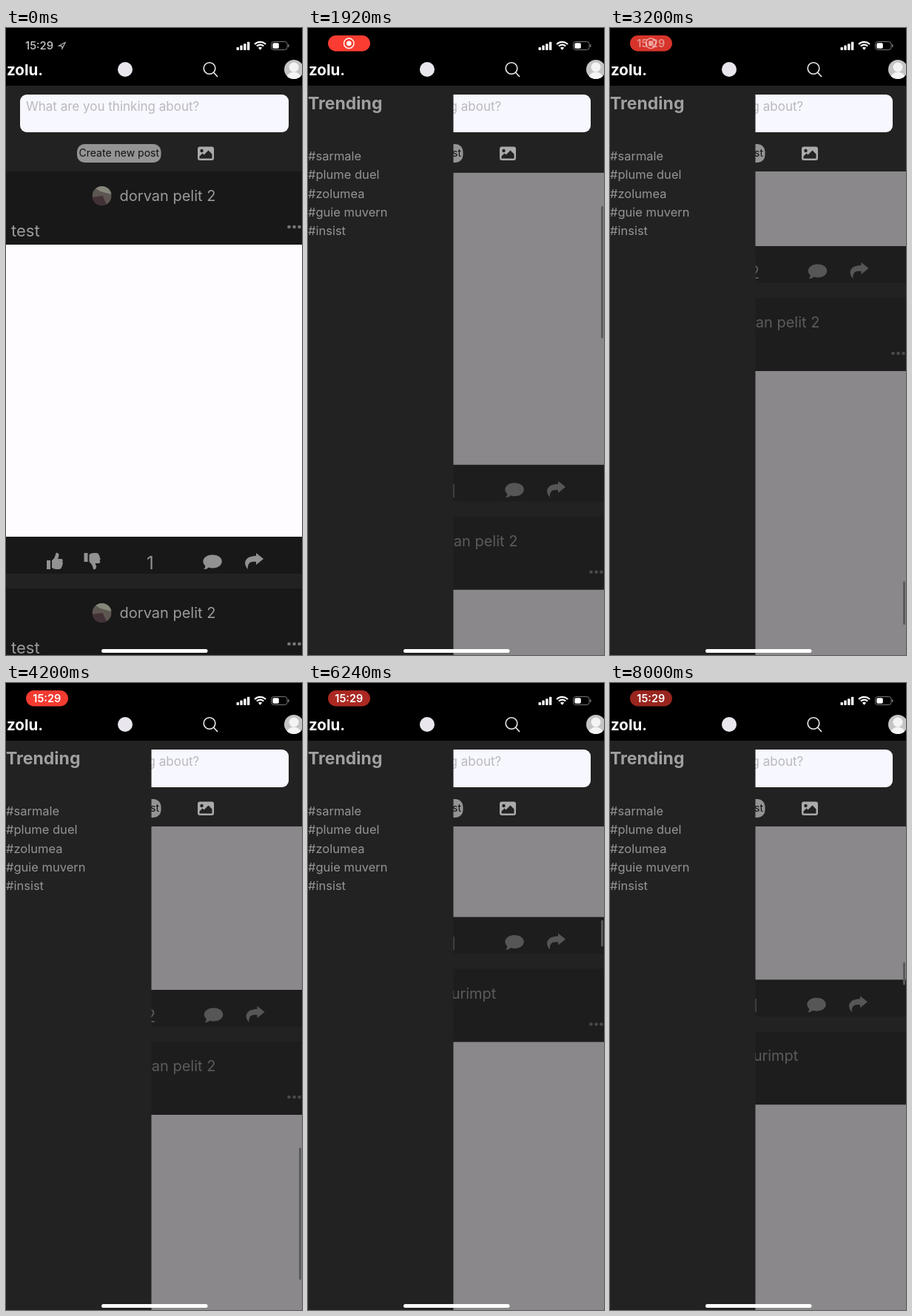
An HTML page with a canvas that plays this animation: 400x848 px, repeating every 8040 ms.

```html
<!DOCTYPE html>
<html lang="en">
<head>
<meta charset="utf-8">
<title>Feed with trending drawer</title>
<style>
html, body { margin: 0; width: 100%; height: 100%; overflow: hidden; background: #000; }
canvas { display: block; width: 400px; height: 848px; }
</style>
</head>
<body>
<canvas id="stage"></canvas>
<script>
const LOOP = 8040, FEED_TOP = 194, PERIOD = 564, DRAWER = 196.5, PAGE = '#222';
const FIRST_USER = 'dorvan pelit 2', SECOND_USER = 'zurimpt';
const TAGS = ['#sarmale', '#plume duel', '#zolumea', '#guie muvern', '#insist'];
// [time, scroll offset]; the dip after 3200 is the bounce at the list end
const SCROLL = [[0, 0], [1720, 0], [1920, 96.5], [2500, 760], [2960, 1420], [3200, 1521],
  [3640, 1401], [4260, 1401], [4800, 1490], [5560, 1707], [6200, 2040], [6920, 2497.5],
  [7450, 3020], [8000, 3670], [8040, 3695]];

const canvas = document.getElementById('stage');
const c = canvas.getContext('2d');
const dpr = window.devicePixelRatio || 1;
canvas.width = 400 * dpr;
canvas.height = 848 * dpr;

const clamp = v => Math.max(0, Math.min(1, v));
const ramp = (t, a, b) => clamp((t - a) / (b - a));
const smooth = v => v * v * (3 - 2 * v);

// Cubic interpolation that stays flat at turning points
function follow(keys, t) {
  let i = 0;
  while (i < keys.length - 2 && t >= keys[i + 1][0]) i++;
  const slope = k => (keys[k + 1][1] - keys[k][1]) / (keys[k + 1][0] - keys[k][0]);
  const tangent = k => {
    if (k < 1 || k > keys.length - 2) return 0;
    const a = slope(k - 1), b = slope(k);
    return a * b <= 0 ? 0 : 2 * a * b / (a + b);
  };
  const [t0, y0] = keys[i], [t1, y1] = keys[i + 1];
  const d = t1 - t0, u = (t - t0) / d, s = smooth(u);
  return y0 + (y1 - y0) * s + d * u * (1 - u) * ((1 - u) * tangent(i) - u * tangent(i + 1));
}

function rect(x, y, w, h, fill, r = 0) {
  c.fillStyle = fill;
  c.beginPath();
  c.roundRect(x, y, w, h, r);
  c.fill();
}
function disc(x, y, r, fill) {
  c.fillStyle = fill;
  c.beginPath();
  c.arc(x, y, r, 0, 7);
  c.fill();
}
function ring(x, y, r, stroke, width) {
  c.strokeStyle = stroke;
  c.lineWidth = width;
  c.beginPath();
  c.arc(x, y, r, 0, 7);
  c.stroke();
}
function text(str, x, y, size, fill, weight = 400, align = 'left') {
  c.font = `${weight} ${size}px Inter, Roboto, sans-serif`;
  c.textAlign = align;
  c.fillStyle = fill;
  c.fillText(str, x, y);
}
function shape(d, x, y, fill, flip = 1) {
  c.save();
  c.translate(x, y);
  c.scale(1, flip);
  c.fillStyle = fill;
  c.fill(new Path2D(d));
  c.restore();
}
function clipped(path, draw) {
  c.save();
  c.beginPath();
  path();
  c.clip();
  draw();
  c.restore();
}
function faded(alpha, draw) {
  if (alpha <= 0) return;
  c.save();
  c.globalAlpha *= alpha;
  draw();
  c.restore();
}

const THUMB = 'M-11-1h5v12h-5zM-4-1Q0-4 1-9Q1-12 4-11Q7-9 4-3H9Q12-2 10 1Q12 3 10 5Q11 7 9 8Q9 11 5 11H2Q-1 11-4 9z';
const COMMENT = 'M0-9.5C17-9.5 17 8.5 0 8.5Q-3 8.5-5 7.5Q-8 10.5-12 10Q-9 7.5-10 5C-16-1-11-9.5 0-9.5z';
const SHARE = 'M3-11L13-3 3 5V1C-5 0-9 3-8 11C-16 2-11-7 3-7z';

function postPhoto(x, y) {
  clipped(() => c.arc(x, y, 13, 0, 7), () => {
    rect(x - 13, y - 13, 26, 26, '#5d5650');
    shape('M-13-13H13V-2L-2-6z', x, y, '#85877a');
    shape('M-13 2L1 0 7 13H-13z', x, y, '#423136');
  });
}

function post(i, y) {
  const name = i < 4 ? FIRST_USER : SECOND_USER;
  const count = i % 3 ? 2 : 1;
  const grey = '#9b9b9b', icon = '#929292';
  rect(0, y, 400, 544, '#181818');
  c.font = '400 20px Inter, Roboto, sans-serif';
  const left = 200 - (c.measureText(name).width + 37) / 2;
  postPhoto(left + 13, y + 33);
  text(name, left + 37, y + 40, 20, grey);
  text('test', 7, y + 88, 22, grey);
  if (i !== 7) for (let k = 0; k < 3; k++) disc(382.5 + k * 7, y + 75, 2.3, '#777');
  rect(0, y + 99, 400, 395, '#fffcff');
  const nudge = count - 1;
  shape(THUMB, 66 - nudge, y + 527, icon);
  shape(THUMB, 116.5 - nudge, y + 527, icon, -1);
  text(count, 195, y + 538, 24, icon, 400, 'center');
  shape(COMMENT, 279 + nudge * 1.5, y + 528, icon);
  shape(SHARE, 335 + nudge * 1.5, y + 527, icon);
}

function scrollbar(t, offset) {
  const content = t < 4260 ? 2330 : t < 5700 ? 10412 : t < 7500 ? 11570 : 13435;
  const max = content - 929;
  const full = 595 * 700 / content;
  const h = full - Math.max(0, offset - max);
  const y = offset > max ? 807 - h : 212 + offset / max * (595 - full);
  faded(ramp(t, 1740, 1840), () => rect(396, y, 3, h, '#5a595b', 1.5));
}

function feed(t, open, veil) {
  const offset = follow(SCROLL, t);
  clipped(() => c.rect(0, FEED_TOP, 400, 848 - FEED_TOP), () => {
    const first = Math.floor(offset / PERIOD);
    for (let i = first; i < first + 3; i++) post(i, FEED_TOP + i * PERIOD - offset);
    faded(open * 0.53 + veil * 0.24, () => rect(0, FEED_TOP, 400, 654, PAGE));
    scrollbar(t, offset);
  });
}

function composer() {
  rect(19, 90, 363, 51, '#f7f7ff', 9);
  text('What are you thinking about?', 27, 112, 17, '#b9b9be');
  rect(96, 157, 113.5, 25, '#949494', 10);
  text('Create new post', 152.8, 174, 14, '#111', 400, 'center');
  rect(259, 160.5, 22, 18.5, '#aaa', 3);
  disc(264.5, 166, 2.2, PAGE);
  shape('M0 0V-3L4-7 6-5 12-11 17-6V0z', 261.5, 176.5, PAGE);
}

function drawer(open) {
  const x = -DRAWER * (1 - open);
  rect(x, 78, DRAWER, 770, PAGE);
  text('Trending', x, 109.5, 23, '#a0a0a0', 700);
  TAGS.forEach((tag, i) => text(tag, x, 179 + i * 25.3, 16.5, '#949494'));
}

function header() {
  rect(0, 0, 400, 78, '#000');
  text('zolu.', 1, 64, 20.5, '#fff', 700);
  disc(161, 56, 10, '#e9e6ee');
  ring(275, 54.5, 7.8, '#eee', 1.6);
  c.beginPath();
  c.moveTo(280.7, 60.3);
  c.lineTo(286, 66);
  c.stroke();
  clipped(() => c.arc(389, 56, 13, 0, 7), () => {
    rect(376, 43, 26, 26, '#c4c4c4');
    disc(389, 53, 6.5, '#f4f4f4');
    disc(389, 70, 10.5, '#f4f4f4');
  });
}

function pill(t) {
  let glow = 0.8 + 0.2 * Math.cos((t - 4080) / 1600 * 2 * Math.PI);
  if (t < 3400) glow = t < 3200 ? 1 - 0.14 * ramp(t, 3000, 3200) : 0.86 - 0.24 * ramp(t, 3200, 3400);
  const shade = [250, 60, 50].map(v => Math.round(v * glow));
  rect(27, 10, 57, 21.5, `rgb(${shade})`, 10.75);
  const clock = ramp(t, 3100, 3320);
  faded(1 - clock, () => {
    ring(55.3, 20.8, 6.8, '#fff', 1.4);
    disc(55.3, 20.8, 3.4, '#fff');
  });
  faded(clock, () => text('15:29', 55.3, 26, 14.5, '#fff', 600, 'center'));
}

function statusBar(t) {
  const recording = ramp(t, 320, 520);
  faded(1 - recording, () => {
    text('15:29', 26, 29, 14.8, '#c8c8c8', 500);
    c.strokeStyle = '#b5b5b5';
    c.lineWidth = 1.2;
    c.stroke(new Path2D('M71.5 24L80 19.5 76 28 75.5 24.3z'));
  });
  faded(recording, () => pill(t));
  for (let i = 0; i < 4; i++) rect(311.5 + i * 4.8, 26 - i * 2.4, 3.4, 4 + i * 2.4, '#fff', 0.8);
  c.strokeStyle = '#fff';
  c.lineWidth = 2.2;
  for (const r of [6.4, 10.2]) {
    c.beginPath();
    c.arc(343.5, 29, r, -Math.PI * 0.76, -Math.PI * 0.24);
    c.stroke();
  }
  shape('M0 0L-2.6-3Q0-5 2.6-3z', 343.5, 29.8, '#fff');
  c.strokeStyle = '#777';
  c.lineWidth = 1;
  c.beginPath();
  c.roundRect(358.5, 18.5, 21.5, 11, 3.2);
  c.stroke();
  rect(360.3, 20.3, 8.5, 7.4, '#fff', 1.6);
  rect(381, 22, 1.5, 4, '#777', 0.7);
}

function draw(now) {
  const t = now % LOOP;
  const open = smooth(ramp(t, 1050, 1350));
  const veil = ramp(t, 5320, 5560) - ramp(t, 5560, 5800);
  c.setTransform(dpr, 0, 0, dpr, 0, 0);
  rect(0, 0, 400, 848, PAGE);
  feed(t, open, veil);
  composer();
  drawer(open);
  header();
  faded(veil * 0.6, () => rect(0, 0, 400, 848, PAGE));
  statusBar(t);
  rect(129, 840, 143.5, 5, '#fff', 2.5);
}

const start = performance.now();
function tick() {
  draw(performance.now() - start);
  requestAnimationFrame(tick);
}
tick();
</script>
</body>
</html>
```
